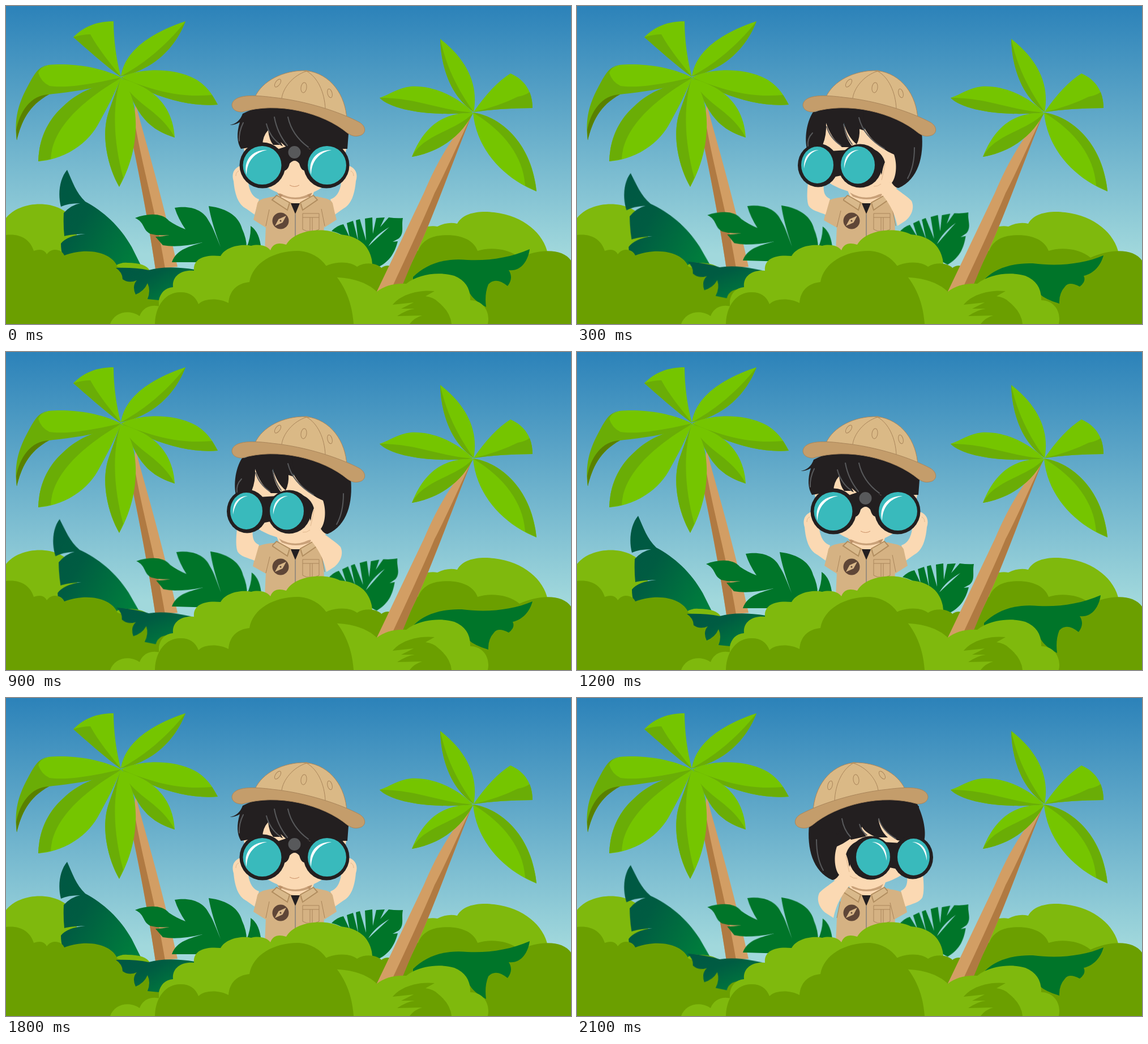
Write an HTML page that moves like this. It is 998 px wide and 561 px high and loops after 2400 ms.

```html
<!DOCTYPE html>
<html lang="en">
<head>
<meta charset="utf-8">
<title>Jungle explorer</title>
<style>
html, body { margin: 0; width: 100%; height: 100%; overflow: hidden; }
svg { display: block; width: 100vw; height: 100vh; }

.lime { fill: #75c500; }
.shade { fill: #6aad06; }
.bush { fill: #7fb90d; }
.moss { fill: #6b9f00; }
.jungle { fill: #007529; }
.wood { fill: #d29e64; }
.bark { fill: #b07a42; }
.skin { fill: #fbd9b3; }
.shirt { fill: #d5b283; }
.ink { fill: #231f20; }
.lens { fill: #39babc; }
.glare { fill: #fff; }
.seam { fill: none; stroke: #a9855a; stroke-width: 1; }
.strand { fill: none; stroke: #58595b; stroke-width: 2; stroke-linecap: round; }

/* Front pose alternates with a look to the left twice, then to the right twice. */
.front { animation: blink .6s step-end infinite; }
.away { animation: blink .6s step-end -.3s infinite; }
.left { animation: look 2.4s step-end infinite; }
.right { animation: look 2.4s step-end -1.2s infinite; }
.leaf { animation: sway .6s step-end infinite; }
@keyframes blink { 0% { visibility: visible } 50%, 100% { visibility: hidden } }
@keyframes look {
  0%, 25%, 50%, 100% { visibility: hidden }
  12.5%, 37.5% { visibility: visible }
}
@keyframes sway { 0% { transform: none } 50%, 100% { transform: var(--pose) } }
.fan { transform-origin: 239px 455px; --pose: translate(-4px, -2px) rotate(-3.3deg); }
.split { transform-origin: 400px 450px; --pose: rotate(1.7deg); }
.comb { transform-origin: 650px 455px; --pose: translate(-1px, -5px) rotate(-6deg); }
.low { transform-origin: 300px 465px; --pose: rotate(6deg); }
</style>
</head>
<body>
<svg viewBox="0 0 998 561" preserveAspectRatio="none">
  <defs>
    <linearGradient id="sky" x2="0" y2="1">
      <stop stop-color="#2c82b9"/>
      <stop offset=".78" stop-color="#a1d8dc"/>
    </linearGradient>
    <linearGradient id="teal" x2="1" y2=".8">
      <stop stop-color="#005743"/>
      <stop offset=".4" stop-color="#005c42"/>
      <stop offset="1" stop-color="#007f3c"/>
    </linearGradient>

    <g id="hat">
      <path fill="#dab986" stroke="#a9855a" d="M440,160C453,132 490,113 530,114C574,119 600,158 602,200Z"/>
      <path class="seam" d="M531,115C507,122 489,145 487,163M531,115C550,125 563,152 564,182"/>
      <path fill="#b8925f" d="M525,115Q531,111 537,116Z"/>
      <g class="seam">
        <ellipse cx="480" cy="136" rx="4" ry="8" transform="rotate(35 480 136)"/>
        <ellipse cx="526" cy="144" rx="5" ry="9" transform="rotate(8 526 144)"/>
        <ellipse cx="572" cy="154" rx="4" ry="8" transform="rotate(-15 572 154)"/>
      </g>
      <path fill="#c49d6b" stroke="#a9855a" d="M399,174C402,155 440,157 470,161C530,167 590,187 624,205C638,213 636,227 623,229C615,231 609,228 603,224C560,188 480,168 417,187C406,187 399,182 399,174Z"/>
    </g>

    <g id="sideHead">
      <path class="shirt" d="M470,337C454,339 445,341 443,346L436,378L459,391L470,350Z"/>
      <path class="seam" d="M466,361L459,390"/>
      <path class="skin" d="M408,312C406,330 406,344 409,352C414,361 427,363 439,368L447,340C439,337 434,330 436,312Z"/>
      <path class="skin" d="M425,205L560,225C571,260 571,302 565,321C543,339 478,338 437,306Z"/>
      <path class="ink" d="M415,191L470,160L600,190L607,224Q510,182 415,200Z"/>
      <path class="ink" d="M498,185C504,225 532,250 560,262C566,280 564,302 556,312C560,318 564,321 568,321C603,306 613,265 609,224L600,200C565,180 525,175 498,185Z"/>
      <path class="strand" stroke-width="1.5" d="M596,250Q596,283 584,304"/>
    </g>

    <g id="sideOptics">
      <path class="ink" d="M446,256L478,254L472,298L452,302Z"/>
      <ellipse class="ink" cx="426" cy="281" rx="36" ry="38.500"/>
      <ellipse class="ink" cx="500" cy="282" rx="38.500" ry="38.500"/>
      <path class="ink" d="M522,252Q539,258 544,276L538,298Z"/>
      <ellipse class="lens" cx="424.500" cy="280.500" rx="28.500" ry="32.500"/>
      <ellipse class="lens" cx="496" cy="280.500" rx="30" ry="33"/>
      <path id="shine" class="glare" d="M401,287C400,266 410,254 427,254C412,257 404,269 401,287Z"/>
      <use href="#shine" x="71"/>
      <path class="skin" d="M545,273C549,284 550,296 551,306C554,320 581,332 591,344C597,357 590,371 580,379L566,388C561,366 555,352 536,329L524,319Q537,319 538,307C538,292 541,282 545,273Z"/>
      <path fill="none" stroke="#dfb88e" d="M544,279Q541,296 538,307M524,318Q531,319 537,314"/>
    </g>
  </defs>

  <rect width="998" height="561" fill="url(#sky)"/>

  <!-- back bushes -->
  <path class="bush" d="M0,374C20,349 65,343 95,357Q112,365 118,378L140,460L0,460Z"/>
  <path class="bush" d="M695,440C708,399 738,385 762,389Q780,380 797,384C808,363 840,361 862,364C915,370 950,402 957,437V480H695Z"/>
  <path class="moss" d="M690,475C702,445 714,430 728,432Q736,411 760,406C794,400 825,409 833,432C853,425 888,427 907,444C942,428 983,427 998,449V561H690Z"/>

  <!-- left palm -->
  <path class="wood" d="M229,172C240,218 272,318 303,460L264,464C253,390 236,300 222,235Z"/>
  <path class="bark" d="M228,208C240,280 265,365 281,463L264,464C253,390 236,300 222,235Z"/>
  <path class="lime" d="M203,125C172,102 142,75 119,55C138,36 160,27 190,27C190,60 195,95 203,125Z"/>
  <path class="shade" d="M203,125C172,102 142,75 119,55Q135,50 149,50C163,76 185,102 203,125Z"/>
  <path class="lime" d="M203,124C209,82 250,49 317,27C299,74 260,113 203,124Z"/>
  <path class="shade" d="M203,124C250,98 286,66 317,27C299,74 260,113 203,124Z"/>
  <path class="lime" d="M203,126C240,108 292,111 324,124C350,134 364,154 374,174C325,178 265,163 203,126Z"/>
  <path class="shade" d="M203,126C260,150 308,162 364,157L374,174C325,178 265,163 203,126Z"/>
  <path class="lime" d="M205,128C246,140 294,165 298,232C258,220 235,198 216,148Z"/>
  <path class="shade" d="M216,148C238,177 276,190 298,232C258,220 235,198 216,148Z"/>
  <path class="lime" d="M203,126C238,165 239,250 200,319C181,286 166,229 182,185Z"/>
  <path class="shade" d="M203,126C186,180 191,244 207,303L200,319C181,286 166,229 182,185Z"/>
  <path class="lime" d="M203,127C165,140 130,148 100,178C70,205 58,240 57,274C92,272 138,252 162,210C180,178 193,152 203,127Z"/>
  <path class="shade" d="M203,127C165,140 130,148 100,178C70,205 58,240 57,274L79,270C81,229 112,180 203,127Z"/>
  <path class="lime" d="M203,126C160,105 110,101 75,104Q59,108 55,119L75,150C115,151 168,147 203,126Z"/>
  <path class="shade" d="M203,126C160,136 108,146 77,141Q62,134 57,118C62,105 75,104 75,104C55,106 47,126 34,150C19,180 15,205 19,237C27,205 39,176 76,156C115,151 168,147 203,126Z"/>
  <path fill="#598000" d="M76,156C43,157 24,187 18,219L19,237C27,205 39,176 76,156Z"/>

  <!-- back leaves -->
  <path class="jungle leaf comb" d="M575,397Q585,387 596,385L607,408L602,383L613,379L622,414L618,378L625,376L636,414L634,375L647,373L648,402L654,374L669,373L661,390L676,373Q690,375 701,374C698,389 704,400 694,410L683,416L692,415C686,438 676,452 655,462L635,448C618,416 598,403 575,397ZM677,390Q651,405 640,424Q657,408 677,390Z"/>
  <path class="leaf fan" fill="url(#teal)" d="M108,289C117,309 124,330 140,345C172,362 201,388 222,425L242,465L190,470L100,440Q97,431 97,419Q108,405 140,402Q112,403 103,406Q101,388 102,365Q115,351 131,348Q109,348 97,354C91,331 95,304 108,289Z"/>
  <path class="jungle leaf split" d="M228,374C249,366 275,364 288,379Q301,388 317,394Q304,375 298,356C326,351 349,360 358,379C366,391 371,406 379,425Q363,382 358,353C393,357 412,373 417,393Q425,410 425,426Q433,407 432,388Q448,398 451,430L445,452H293C301,428 327,424 347,417Q305,427 277,422L264,407C282,407 293,402 310,400Q278,408 255,402C240,394 246,382 228,374Z"/>

  <!-- explorer -->
  <g class="front">
    <path id="arm" class="skin" d="M414,282C402,286 398,297 402,309C404,330 409,350 425,358L439,368L447,341C437,338 430,328 428,312Z"/>
    <use href="#arm" transform="matrix(-1 0 0 1 1020 0)"/>
    <path id="sleeve" class="shirt" d="M475,336C455,339 447,341 444,348Q441,363 437,377L459,391L476,350Z"/>
    <use href="#sleeve" transform="matrix(-1 0 0 1 1021 0)"/>
  </g>
  <path class="shirt" d="M457,432L459,388Q467,354 470,337L551,336C560,350 562,380 563,432Z"/>
  <path class="seam" d="M465,359L459,388M557,358L563,388"/>
  <path class="skin" d="M478,325H545L538,344L512,349L484,341Z"/>
  <path fill="#c9a179" d="M482,329Q512,347 541,328L537,336Q512,346 487,336Z"/>
  <path class="ink" d="M503,348H519L511,367Z"/>
  <path fill="#d9b98b" stroke="#b18d5f" stroke-width="2" d="M478,334L501,347L497,360L470,342ZM543,334L520,347L524,360L550,342Z"/>
  <path stroke="#85807a" stroke-width="1.5" d="M511,367V416"/>
  <circle cx="485" cy="379" r="14.500" fill="#5f4637"/>
  <path fill="#d8b789" d="M475,388L481.500,376L495,370L488.500,382Z"/>
  <circle cx="485" cy="379" r="1.500" fill="#5f4637"/>
  <path class="seam" d="M524,366H553V394L546,397H531L524,394ZM524,373H553M537,373V396M541,373V396"/>

  <g class="front">
    <path class="skin" d="M418,220H604C606,278 570,334 511,335C455,334 415,285 418,220Z"/>
    <path fill="#bc9168" d="M479,330L489,333L485,338ZM541,330L532,333L536,338Z"/>
    <path class="ink" d="M418,190Q412,207 395,210Q405,210 413,205C407,224 408,241 415,252L453,246Q453,230 463,219Q465,237 472,245H484L496,251H527L537,252H603L606,212C560,165 475,160 418,190Z"/>
    <path class="skin" d="M485,240L499,252L491,251ZM519,250L533,252L522,256Z"/>
    <path class="strand" d="M419,206Q411,222 412,238M460,208Q466,231 484,244M474,196Q479,224 497,246M498,196Q505,228 534,249"/>
    <use href="#hat"/>
    <path class="ink" d="M482,252L497,247H522L538,253L533,290C523,292 521,287 518,278Q510,268 501,278Q498,292 487,291Z"/>
    <circle class="ink" cx="453" cy="281" r="40.500"/>
    <circle class="ink" cx="566" cy="281" r="40.500"/>
    <circle class="lens" cx="452.500" cy="281" r="34"/>
    <circle class="lens" cx="567" cy="281" r="34"/>
    <path id="gleam" class="glare" d="M425,298C418,273 435,253 461,254C440,258 425,273 425,298Z"/>
    <use href="#gleam" x="114"/>
    <circle cx="509.500" cy="258" r="12" fill="#58595b" stroke="#231f20" stroke-width="2"/>
    <path fill="none" stroke="#c98f66" d="M501,316Q510,321 518,316"/>
    <path fill="none" stroke="#dfb88e" d="M411,291Q406,293 406,300M609,291Q614,293 614,300"/>
  </g>

  <g class="left">
    <use href="#sideHead"/>
    <path class="ink" d="M417,187C404,207 401,240 408,258L434,245Q441,228 440,206Q448,232 468,249L487,249Q472,230 471,206Q479,232 494,244Q500,232 499,217L508,220L506,180Z"/>
    <path class="strand" d="M416,224Q406,234 408,248M441,213Q447,233 466,246M471,209Q475,230 486,244M498,197Q506,230 543,252"/>
    <use href="#hat"/>
    <use href="#sideOptics"/>
  </g>
  <g class="right">
    <use href="#sideHead" transform="matrix(-1 0 0 1 1019 0)"/>
    <path class="ink" d="M600,185C615,215 618,245 611,258L566,251C550,242 538,228 532,212Q535,234 549,246H530C514,240 503,232 500,219Q503,235 511,244L484,250C474,237 468,226 467,212Q468,230 461,241L430,230V190Z"/>
    <path class="strand" d="M468,213Q471,232 483,245M499,223Q502,235 512,242M533,213Q540,235 563,248"/>
    <g transform="matrix(-1 0 0 1 1019 0)">
      <use href="#hat"/>
      <use href="#sideOptics"/>
    </g>
  </g>

  <!-- left ground -->
  <path class="bush" d="M180,475Q192,451 215,453Q247,453 254,467L250,490Z"/>
  <path class="moss" d="M0,404C25,401 43,412 49,432Q66,426 72,438C80,426 98,428 103,440C146,424 188,436 197,460Q208,463 212,466C250,460 292,474 305,510V561H0Z"/>
  <path class="bush" d="M184,561C191,540 218,534 236,547C242,531 258,525 275,531V561Z"/>
  <path class="leaf low" fill="url(#teal)" d="M194,462Q227,461 252,466Q284,457 334,465L299,500Q273,500 270,519L250,517Q256,502 250,489Q244,503 229,509Q222,494 231,484Q217,490 206,482Q206,470 194,462Z"/>

  <!-- middle mounds -->
  <path class="bush" d="M270,561V520Q274,498 295,496C293,477 309,465 332,467C330,446 350,438 379,441C388,424 417,419 433,423C449,419 462,424 467,431Q473,414 495,421C510,394 563,389 590,403C624,406 641,423 646,447L654,510V561Z"/>
  <path class="moss" d="M550,470C569,448 608,449 620,460C636,450 657,455 663,462Q675,453 690,464L710,495L650,520H570Z"/>

  <!-- right palm -->
  <path class="wood" d="M824,189C790,228 762,273 738,330L695,420L652,510H690L718,450C748,390 781,295 824,189Z"/>
  <path class="bark" d="M824,189C808,222 780,286 757,330C736,380 712,432 678,505H695L718,450C748,390 781,295 824,189Z"/>
  <path class="lime" d="M826,187C835,140 815,95 767,58C768,105 784,158 826,187Z"/>
  <path class="shade" d="M826,187C801,151 779,113 767,58C768,105 784,158 826,187Z"/>
  <path class="lime" d="M826,187Q859,139 891,119C917,130 930,152 930,180Q875,180 826,187Z"/>
  <path class="shade" d="M826,187Q870,177 904,160Q916,158 925,152Q930,165 930,180Q875,180 826,187Z"/>
  <path class="lime" d="M825,188C797,159 755,140 715,142C693,144 678,156 660,162C683,185 755,195 825,188Z"/>
  <path class="shade" d="M825,188C765,184 727,162 660,162C683,185 755,195 825,188Z"/>
  <path class="lime" d="M825,189C780,187 741,205 717,266C757,259 800,237 825,189Z"/>
  <path class="shade" d="M825,189C794,221 737,226 717,266C757,259 800,237 825,189Z"/>
  <path class="lime" d="M825,188C870,194 928,238 937,327C883,306 831,256 825,188Z"/>
  <path class="shade" d="M825,188C870,194 928,238 937,327L917,317C914,268 883,223 825,188Z"/>

  <!-- right ground -->
  <path class="jungle front" d="M719,478C742,455 775,444 815,448C852,450 891,444 925,429C922,450 909,469 888,466Q897,480 886,494Q865,477 852,491Q845,508 848,531Q823,518 817,502L775,484L719,484Z"/>
  <path class="jungle away" d="M721,481C740,462 770,453 805,454C850,460 895,455 930,440C925,458 913,472 895,476Q900,486 888,495Q869,485 862,495Q851,507 852,525Q828,518 817,508L775,488L721,488Z"/>
  <path class="bush" d="M572,479C603,477 637,486 655,504Q676,488 707,490C728,473 765,468 792,476Q821,488 820,519C843,519 856,540 851,561H572Z"/>
  <path class="moss" d="M683,527C697,509 728,500 757,503L741,512Q755,514 762,521Q785,539 787,561H713Q721,550 735,546L691,547Q707,536 722,534L698,534L720,523Z"/>
  <path class="moss" d="M263,561C264,526 284,504 309,505Q332,505 340,526C350,515 377,515 393,524C395,500 410,489 430,487C436,452 475,431 518,432Q549,435 566,459C593,482 611,516 614,561Z"/>
</svg>
</body>
</html>
```
